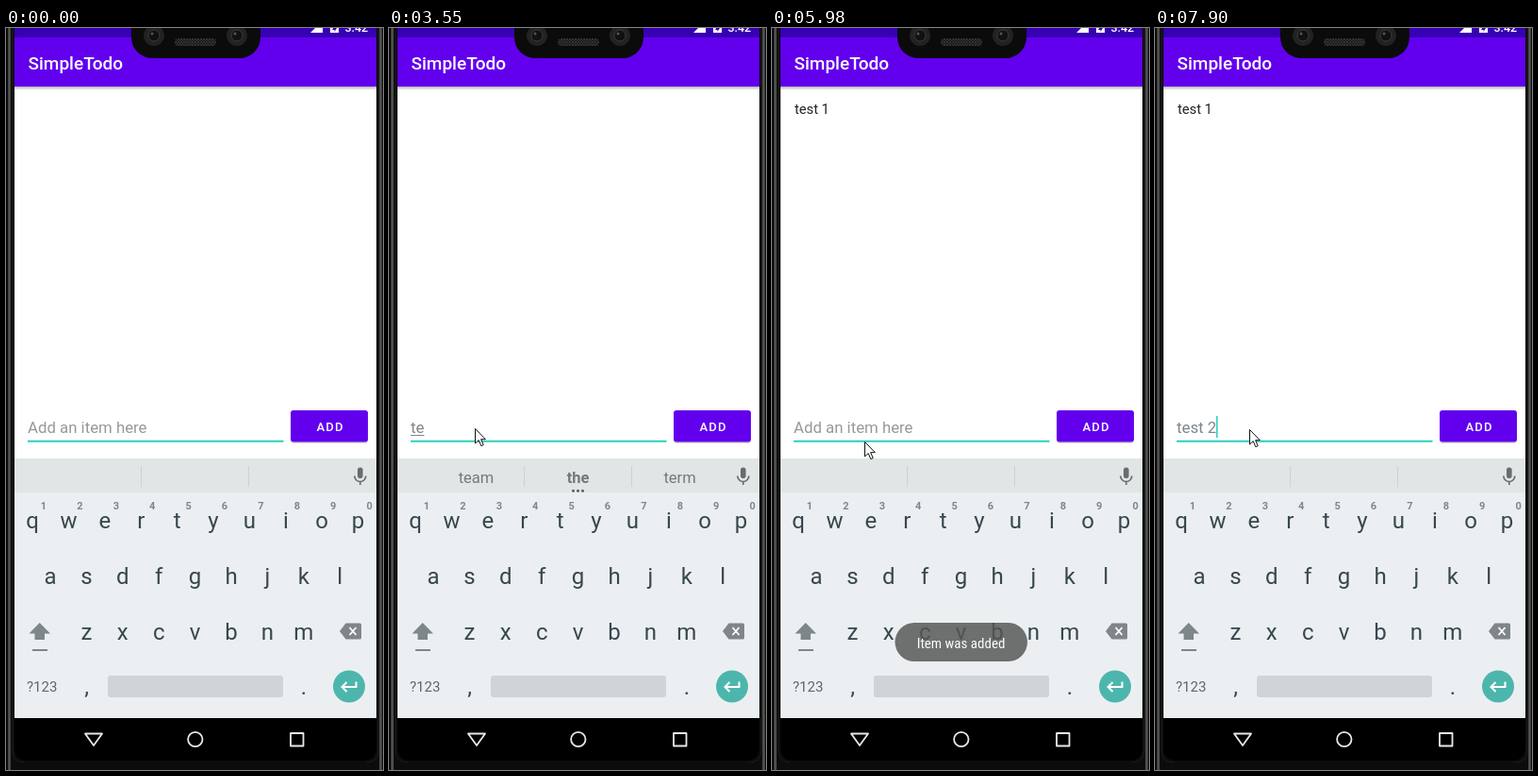
Recreate the animation shown at these times as an HTML page. Size 400 px wide and 786 px high, loop 8000 ms.

```html
<!DOCTYPE html>
<html lang="en">
<head>
<meta charset="utf-8">
<title>To-do list demo</title>
<style>
html, body { margin: 0; height: 100%; overflow: hidden; background: #0c0c0c; }
svg { display: block; width: 100vw; height: 100vh; font-family: Roboto, sans-serif; }
.mid { text-anchor: middle; }
#keys { font-size: 24px; fill: #37474f; }
#keys .digit { font-size: 11px; font-weight: 700; fill: #7d878c; }
#words { font-size: 16.5px; fill: #72797d; }
.bold { font-weight: 700; }
</style>
</head>
<body>
<svg viewBox="0 0 400 786">
  <defs>
    <linearGradient id="fall" x2="0" y2="1">
      <stop stop-color="#b4b4b4"/><stop offset="1" stop-color="#fff"/>
    </linearGradient>
    <clipPath id="btnClip"><rect x="302" y="405" width="82" height="33.5" rx="3"/></clipPath>
    <pattern id="mesh" width="3" height="3" patternUnits="userSpaceOnUse">
      <path d="M0 3L3 0M0 0L3 3" stroke="#3c3c3c" stroke-width=".7"/>
    </pattern>
  </defs>

  <!-- phone body -->
  <rect width="400" height="786" fill="#0c0c0c"/>
  <path d="M3.5 0V786M397.5 0V786" stroke="#555" stroke-width="2.5"/>
  <path d="M7 0V765Q7 778 20 778M395 0V765Q395 778 382 778" stroke="#1c1c1c" fill="none"/>
  <path d="M9 0H393V762Q393 776 379 776H23Q9 776 9 762Z"/>

  <!-- app -->
  <rect x="9" y="62" width="384" height="394" fill="#fff"/>
  <rect x="9" y="62" width="384" height="4" fill="url(#fall)"/>
  <rect x="9" width="384" height="10.5" fill="#3700b3"/>
  <rect x="9" y="10" width="384" height="52" fill="#6200ee"/>
  <text x="23.500" y="43.500" font-size="19" font-weight="500" fill="#fff">SimpleTodo</text>
  <g fill="#fff">
    <path d="M323 5L336 -8V5ZM344 -6H353V5H344Z"/>
    <path d="M349 -3L346 2H348.500V4L351 0H349Z" fill="#3700b3"/>
    <text x="359.500" y="4" font-size="12.500" font-weight="500">3:42</text>
  </g>
  <path d="M133 0V10A22 22 0 0 0 155 32H248A22 22 0 0 0 270 10V0Z" fill="#0b0b0b"/>
  <g id="lenses"></g>
  <rect x="179" y="11" width="44" height="8" rx="4" fill="#181818"/>
  <rect x="179" y="11" width="44" height="8" rx="4" fill="url(#mesh)"/>

  <text id="item" x="24" y="91" font-size="14.700" fill="#222">test 1</text>
  <text id="field" x="23" y="429" font-size="16.800" xml:space="preserve"></text>
  <path id="mark" stroke="#7b858a"/>
  <path d="M23 437.800H294.500" stroke="#2ad0bd" stroke-width="2"/>
  <rect id="caret" y="411" width="1.500" height="23" fill="#2ad0bd"/>

  <rect x="302" y="406.500" width="82" height="33.500" rx="3" fill="#000" opacity=".16"/>
  <rect x="302" y="405" width="82" height="33.500" rx="3" fill="#6200ee"/>
  <g clip-path="url(#btnClip)"><circle id="ripple" cx="343" cy="422" fill="#fff"/></g>
  <text x="329.500" y="427" font-size="13" font-weight="500" letter-spacing="1.200" fill="#fff">ADD</text>

  <!-- keyboard -->
  <rect x="9" y="456" width="384" height="275" fill="#eceff1"/>
  <rect x="9" y="456" width="384" height="36" fill="#e1e5e6"/>
  <path d="M143.500 464V486M257.500 464V486" stroke="#cdd2d4"/>
  <g id="words" class="mid">
    <text x="92.500" y="481.500"></text>
    <text x="200.500" y="481.500" class="bold"></text>
    <text x="308.500" y="481.500"></text>
    <path d="M195.500 490.300h.01M200.500 490.300h.01M205.500 490.300h.01" stroke="#555d61" stroke-width="3" stroke-linecap="round"/>
  </g>
  <g fill="none" stroke="#666d70" stroke-width="1.700">
    <rect x="373" y="465.500" width="5.600" height="11.500" rx="2.800" fill="#666d70" stroke="none"/>
    <path d="M369.800 474.500a6 6 0 0 0 12 0M375.800 480.500V484"/>
  </g>
  <g id="keys" class="mid"></g>
  <text x="22" y="703" font-size="15" fill="#5b676d">?123</text>
  <rect x="108" y="686" width="186" height="23" rx="3" fill="#cfd4d7"/>
  <path d="M35.700 630L47 641.500H41V648H30.500V641.500H24.500ZM28 658H44V660H28Z" fill="#7f8689"/>
  <path d="M354 639L360.500 630.500H375.500Q377 630.500 377 632V646Q377 647.500 375.500 647.500H360.500Z" fill="#7f8689"/>
  <path d="M364.500 635L371.500 643M371.500 635L364.500 643" stroke="#fff" stroke-width="1.800"/>
  <circle cx="364" cy="697.500" r="17" fill="#4db6ac"/>
  <path d="M371.500 692.500V698H357M361.500 693L356.500 698L361.500 703" fill="none" stroke="#fff" stroke-width="2"/>

  <!-- navigation -->
  <g fill="none" stroke="#e8e8e8" stroke-width="1.800" stroke-linejoin="round">
    <path d="M84 747.500H102L93 760Z"/>
    <circle cx="200.800" cy="753.500" r="7.700"/>
    <rect x="302" y="747" width="13.500" height="13.500"/>
  </g>

  <g id="toast">
    <rect x="130.500" y="630" width="140.500" height="41" rx="20.500" fill="#555" opacity=".9"/>
    <text x="200.500" y="656.500" class="mid" font-size="15" fill="#fff" style="font-family:'Roboto Condensed',Roboto,sans-serif;font-stretch:condensed">Item was added</text>
  </g>
  <path id="pointer" d="M.5 .5V16L4.200 12.600L6.800 18.700L9.200 17.600L6.600 11.700H11.300Z" fill="#fff" stroke="#111"/>
</svg>

<script>
const $ = id => document.getElementById(id);
const LOOP = 8000;
const HINT = 'Add an item here';

// [time, text, underlined, suggestions]
const typing = [
  [0, '', 0, ''],
  [2380, 't', 0, ''],
  [2550, 't', 1, 'to the this'],
  [2950, 'te', 0, 'to the this'],
  [3070, 'te', 1, 'team the term'],
  [3620, 'tes', 0, 'team the term'],
  [3780, 'tes', 1, 'test yes tea'],
  [3980, 'test', 0, 'test yes tea'],
  [4080, 'test', 1, 'tests test testing'],
  [4230, 'test ', 0, 'tests test testing'],
  [4430, 'test 1', 0, 'tests test testing'],
  [4460, 'test 1', 0, ''],
  [5640, '', 0, ''],
  [6590, 't', 0, ''],
  [6920, 't', 1, 'to the this'],
  [6980, 'te', 0, 'to the this'],
  [7090, 'te', 1, 'team the term'],
  [7250, 'tes', 0, 'team the term'],
  [7350, 'tes', 1, 'test yes tea'],
  [7470, 'test', 0, 'test yes tea'],
  [7570, 'test', 1, 'tests test testing'],
  [7690, 'test ', 0, 'tests test testing'],
  [7780, 'test 2', 0, 'tests test testing'],
  [7840, 'test 2', 0, '']
];

// caret toggles, starting hidden
const blinks = [30, 500, 980, 1510, 1970, 3550, 3620, 4940, 5450, 5960, 6470];

// pointer path: [time, x, y]
const path = [
  [230, 379, 766], [300, 335, 660], [400, 235, 490], [500, 170, 427],
  [980, 170, 427], [1100, 138, 405],
  [1270, 138, 405], [1330, 130, 401], [1540, 95.5, 415.5],
  [2040, 95.5, 415.5], [2100, 91, 424],
  [4790, 91, 424], [4870, 160, 410], [4970, 264, 398], [5090, 318, 408], [5250, 342, 417],
  [5680, 342, 417], [5780, 272, 426], [5860, 207, 428], [5980, 98, 438],
  [6190, 100, 425], [LOOP, 100, 425]
];

const clamp = v => Math.max(0, Math.min(1, v));
const span = (t, a, b) => clamp((t - a) / (b - a));

function pointerAt(t) {
  const i = path.findIndex(p => p[0] > t);
  const [a, x, y] = path[i - 1], [b, u, v] = path[i];
  const k = span(t, a, b);
  return [x + (u - x) * k, y + (v - y) * k];
}

function key(x, y, label, cls = '') {
  return `<text x="${x}" y="${y}" class="${cls}">${label}</text>`;
}

const rows = [['qwertyuiop', 28, 530], ['asdfghjkl', 47, 589], ['zxcvbnm', 85.4, 647.5]];
$('keys').innerHTML = rows.map(([letters, x, y], row) =>
  [...letters].map((c, i) => {
    const kx = x + i * 38.4;
    return key(kx, y, c) + (row ? '' : key(kx + 12, 510, (i + 1) % 10, 'digit'));
  }).join('')).join('') + key(85.5, 706, ',') + key(316, 706, '.');

$('lenses').innerHTML = [157, 245].map(x =>
  `<circle cx="${x}" cy="8" r="11" fill="#222"/><circle cx="${x}" cy="8" r="6" fill="#111" stroke="#3a3a3a"/>
   <circle cx="${x - 2}" cy="6" r="1.5" fill="#555"/>`).join('');

const words = $('words').querySelectorAll('text');

function draw(t) {
  const [, text, underlined, suggestions] = typing.findLast(s => s[0] <= t);
  const field = $('field');
  field.textContent = text;
  const width = text ? field.getComputedTextLength() : 0;
  if (!text) field.textContent = HINT;
  field.setAttribute('fill', text ? '#7b858a' : '#989898');
  $('mark').setAttribute('d', underlined ? `M23 431.500H${23 + width}` : '');
  $('caret').setAttribute('x', 23 + Math.floor(width));
  $('caret').style.opacity = blinks.filter(b => b <= t).length % 2;

  const list = suggestions.split(' ');
  words.forEach((w, i) => w.textContent = list[i] || '');
  $('words').style.opacity = suggestions ? 1 : 0;

  $('item').style.opacity = t < 5640 ? 0 : 1;
  $('ripple').setAttribute('r', 48 * span(t, 5430, 5640));
  $('ripple').style.opacity = t < 5430 ? 0 : .24 * (1 - span(t, 5600, 5780));
  const shown = 1 - (1 - span(t, 5700, 6190)) ** 3;
  $('toast').style.opacity = shown * (1 - span(t, 7600, 7900) ** 2);

  const visible = t >= path[0][0];
  $('pointer').style.opacity = visible ? 1 : 0;
  if (visible) $('pointer').setAttribute('transform', `translate(${pointerAt(t)})`);
}

const start = performance.now();
function tick() {
  draw((performance.now() - start) % LOOP);
  requestAnimationFrame(tick);
}
tick();
</script>
</body>
</html>
```
